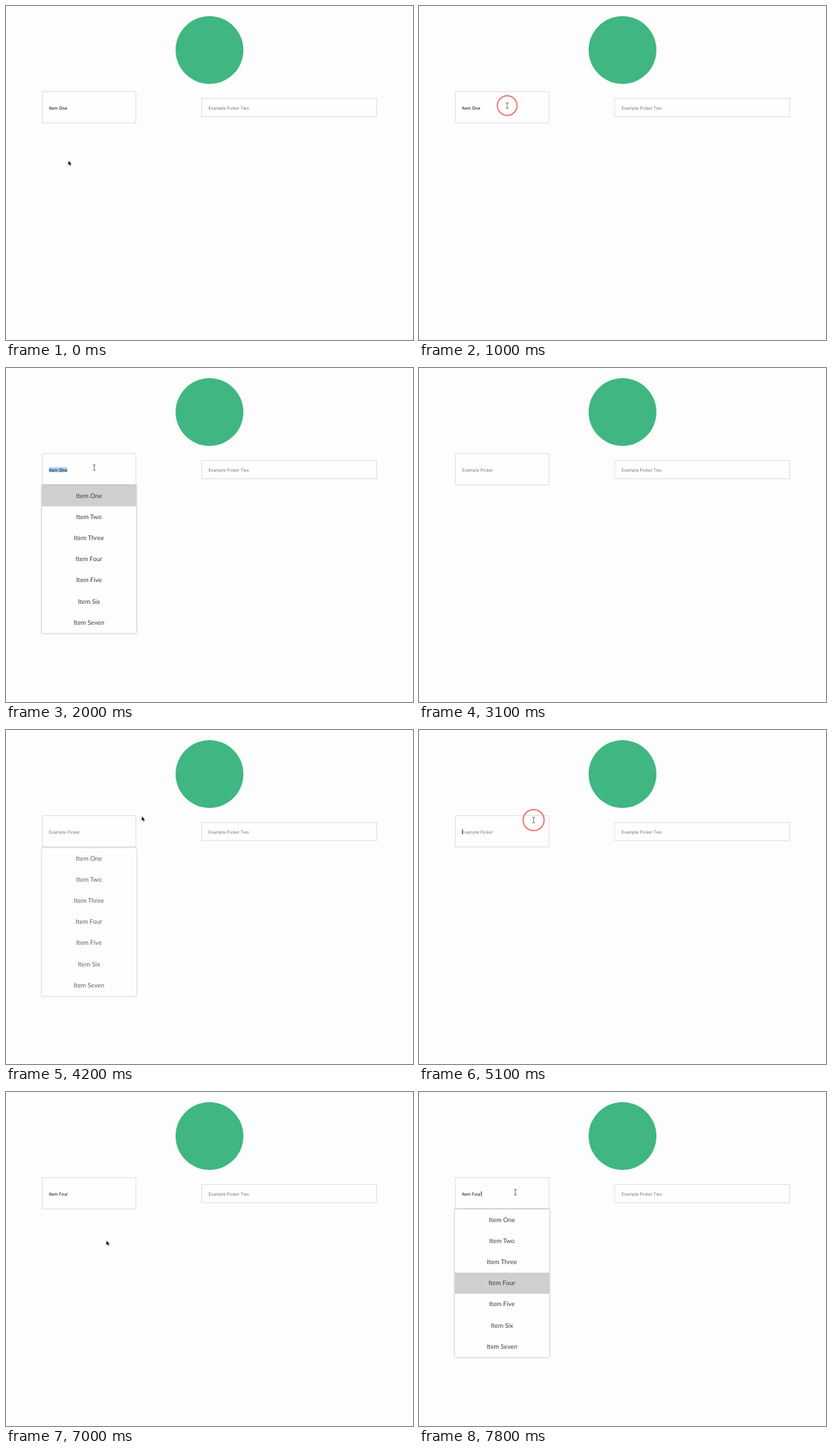
Recreate the animation shown at these times as an HTML page. Size 600 by 493 pixels, loop 8 s.

```html
<!DOCTYPE html>
<html lang="en">
<head>
<meta charset="utf-8">
<title>Item picker</title>
<style>
  html, body { margin: 0; width: 100%; height: 100%; overflow: hidden; background: #fdfdfd; }
  svg { display: block; width: 100%; height: 100%; text-rendering: geometricPrecision; }
  .field { fill: #fefefe; stroke: #dedede; }
  .input { font: 6.3px Inter, "Open Sans", sans-serif; }
  .hint { fill: #757575; }
  .list { fill: #fefefe; filter: drop-shadow(0 .6px 1.6px rgba(0, 0, 0, .38)); }
  .hover { fill: #fefefe; filter: drop-shadow(0 0 1.5px rgba(0, 0, 0, .32)); }
  .item { font: 9.3px Lato, "Open Sans", sans-serif; fill: #2c3e50; text-anchor: middle; }
  .ring { fill: none; stroke: #ee7878; }
</style>
</head>
<body>
<svg viewBox="0 0 600 493">
  <circle cx="300" cy="65" r="50" fill="#40b682"/>
  <rect class="field" x="53.5" y="126.5" width="138" height="46"/>
  <rect class="field" x="288.5" y="136.5" width="258" height="27"/>
  <text class="input hint" x="298.5" y="152.6">Example Picker Two</text>

  <rect id="selection" y="146.5" height="7.5" fill="#a9d0f5"/>
  <text id="value" class="input" x="63.3" y="152.6"></text>
  <rect id="caret" y="146.5" width=".8" height="7.5" fill="#111"/>

  <g id="menu">
    <rect class="list" x="53" y="173" width="139" height="218.4"/>
    <rect id="picked" x="53" width="139" height="31.2" fill="#cfcfcf"/>
    <rect id="hover" class="hover" x="53" width="139" height="31.2"/>
  </g>

  <circle id="ring" class="ring"/>
  <g id="pointer">
    <path id="arrow" fill="#111" stroke="#fff" stroke-width=".7" paint-order="stroke"
      d="M0 .4V7L1.6 5.6 2.7 8 3.7 7.5 2.7 5.3H4.8Z"/>
    <path id="beam" fill="none" stroke="#444" stroke-width=".8"
      d="M-2-4.3Q0-4.3 0-3V3Q0 4.3-2 4.3M2-4.3Q0-4.3 0-3M0 3Q0 4.3 2 4.3"/>
    <path id="hand" fill="#fff" stroke="#333" stroke-width=".8" stroke-linejoin="round"
      d="M-1 1V5.2L-2 4.4C-3 4-3.4 5-2.8 5.8L0 9V10H5V8.5C6 7 5.8 5.5 5.8 4.6 5.8 3.6 4.4 3.6 4.2 4.2 4 3.2 2.6 3.2 2.5 3.8 2.2 3 1 3 .9 3.6V1C.9-.3-1-.3-1 1Z"/>
  </g>
</svg>
<script>
const LOOP = 8000, STEP = 100, FADE = 250, RIPPLE = 200, BLINK = 500;
const ROW = 31.2, TOP = 173, LEFT = 63.3;
const TYPED = 2400, ERASED = 3100, REOPENED = 3650, BLURRED = 4150, CHOSEN = 6600;
const items = ['One', 'Two', 'Three', 'Four', 'Five', 'Six', 'Seven'];

const home = { x: 92, y: 228 };
const moves = [
  { from: 200, to: 700, x: 130, y: 147 },
  { from: 1000, to: 1300, x: 65, y: 146 },
  { from: 1500, to: 1600, x: 130, y: 147 },
  { from: 3700, to: 4100, x: 206, y: 126 },
  { from: 4100, to: 4500, x: 169, y: 133 },
  { from: 5400, to: 6000, x: 138, y: 348 },
  { from: 6000, to: 6300, x: 135, y: 290 },
  { from: 6600, to: 7000, x: 148, y: 219 },
  { from: 7000, to: 7300, x: 142, y: 148 }
];

const drag = { press: 855, release: 1465 };
const reopen = { press: 4945, release: 5200 };
const choose = { press: 6450, release: CHOSEN };
const last = { press: 7350, release: 7450 };
const clicks = [drag, reopen, choose, last];

const menus = [
  { open: 1500, close: TYPED, fade: 1 },
  { open: REOPENED, close: BLURRED, fade: FADE },
  { open: reopen.release, close: CHOSEN, fade: FADE },
  { open: last.release, close: LOOP, fade: FADE }
];

const el = {};
document.querySelectorAll('[id]').forEach(n => el[n.id] = n);
const set = (n, attrs) => Object.entries(attrs).forEach(([k, v]) => n.setAttribute(k, v));
const show = (n, on) => { n.style.display = on ? '' : 'none'; };
const clamp = (v, a = 0, b = 1) => Math.min(b, Math.max(a, v));
const within = (t, a, b) => t >= a && t < b;
const ease = p => p * p * (3 - 2 * p);
// Rises after a, falls after b
const pulse = (t, a, b, rise, fall = rise) =>
  Math.min(clamp((t - a) / rise), clamp(1 - (t - b) / fall));

items.forEach((name, i) => {
  const label = document.createElementNS('http://www.w3.org/2000/svg', 'text');
  set(label, { class: 'item', x: 122.3, y: TOP + ROW * i + 18.5 });
  label.textContent = 'Item ' + name;
  el.menu.append(label);
});

function pointerAt(t) {
  return moves.reduce((at, m) => {
    const p = ease(clamp((t - m.from) / (m.to - m.from)));
    return { x: at.x + (m.x - at.x) * p, y: at.y + (m.y - at.y) * p };
  }, home);
}

function textAt(t) {
  if (t < TYPED) return 'Item One';
  if (t < ERASED) return 'd';
  return t < CHOSEN ? '' : 'Item Four';
}

function caretOn(t) {
  const focus = [[TYPED, BLURRED], [reopen.press, CHOSEN], [last.press, LOOP]];
  return focus.some(([a, b]) => within(t, a, b) && (t - a) % (2 * BLINK) < BLINK);
}

function drawInput(t, x) {
  const text = textAt(t);
  el.value.textContent = text || 'Example Picker';
  el.value.classList.toggle('hint', !text);
  const end = LEFT + (text ? el.value.getComputedTextLength() : 0);
  const from = t < menus[0].open ? clamp(x, LEFT, end) : LEFT;
  show(el.selection, within(t, drag.press, TYPED));
  set(el.selection, { x: from, width: end - from });
  show(el.caret, caretOn(t));
  set(el.caret, { x: end + .3 });
}

function drawMenu(t, y, over) {
  const p = Math.max(...menus.map(m => pulse(t, m.open, m.close, FADE, m.fade)));
  const picked = items.indexOf(textAt(t).slice(5));
  show(el.menu, p > 0);
  set(el.menu, { opacity: p, transform: `translate(0 ${6 * (1 - p)})` });
  show(el.picked, picked >= 0);
  set(el.picked, { y: TOP + ROW * picked });
  show(el.hover, over);
  set(el.hover, { y: TOP + ROW * Math.floor((y - TOP) / ROW) });
}

function drawPointer(t, x, y, over) {
  const inField = within(x, 53, 192) && within(y, 126, TOP);
  show(el.pointer, !within(t, 2700, 3700));
  set(el.pointer, { transform: `translate(${x} ${y})` });
  show(el.hand, over);
  show(el.beam, inField);
  show(el.arrow, !over && !inField);
}

function drawRing(t) {
  const click = clicks.find(c => within(t, c.press, c.release + RIPPLE));
  show(el.ring, click);
  if (!click) return;
  const r = 20 * pulse(t, click.press, click.release, RIPPLE);
  const { x, y } = pointerAt(Math.min(t, click.release));
  set(el.ring, { cx: x, cy: y, r, 'stroke-width': r * .13 });
}

function draw(t) {
  const { x, y } = pointerAt(t);
  const open = menus.some(m => within(t, m.open, m.close));
  const over = open && within(x, 53, 192) && within(y, TOP, TOP + ROW * items.length);
  drawInput(t, x);
  drawMenu(t, y, over);
  drawPointer(t, x, y, over);
  drawRing(t);
}

const start = performance.now();
function tick() {
  const t = (performance.now() - start) % LOOP;
  draw(Math.floor(t / STEP) * STEP);
  requestAnimationFrame(tick);
}
tick();
</script>
</body>
</html>
```
